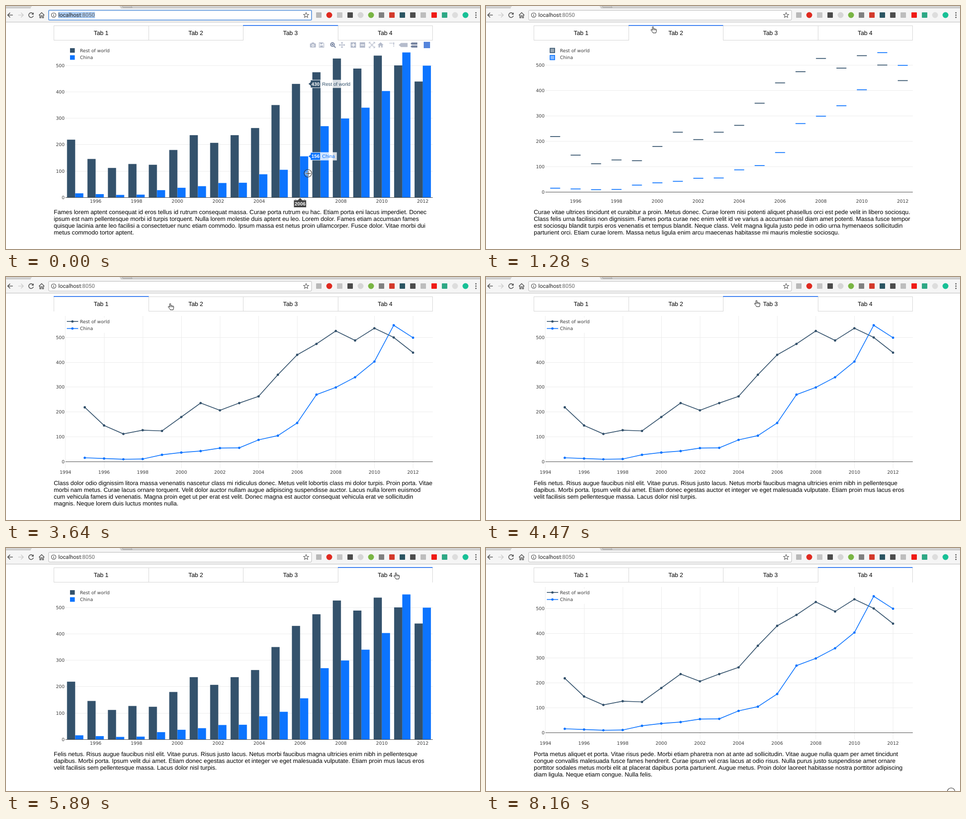
These frames come from a looping animation (1044x536 px, 8.26 s). An HTML page:

```html
<!DOCTYPE html>
<html lang="en">
<head>
<meta charset="utf-8">
<title>Chart tabs</title>
<style>
html, body { margin: 0; width: 100%; height: 100%; overflow: hidden; background: #fff; }
svg { display: block; width: 1044px; height: 536px; text-rendering: geometricPrecision; }
.page { font: 13.24px "Liberation Sans", Arial, sans-serif; }
.url { font: 12.2px Roboto, sans-serif; }
.plot { font: 10px "DejaVu Sans", Verdana, sans-serif; fill: #3c3c3c; }
.hover { font: 10.7px "Liberation Sans", Arial, sans-serif; }
.mid { text-anchor: middle; }
.end { text-anchor: end; }
</style>
</head>
<body>
<svg id="stage" viewBox="0 0 1044 536"></svg>
<script>
const LOOP = 8260;
const DARK = '#34526c', BLUE = '#0c74ff', GRID = '#ececec', AXIS = '#444';
const FIRST_YEAR = 1995;
const SERIES = [
  { name: 'Rest of world', color: DARK, width: 96, data:
    [219, 146, 112, 127, 124, 180, 236, 207, 236, 263, 350, 430, 474, 526, 488, 537, 500, 439] },
  { name: 'China', color: BLUE, width: 63, data:
    [16, 13, 10, 11, 28, 37, 43, 55, 56, 88, 105, 156, 270, 299, 340, 403, 549, 499] }
];
const PLOT = { left: 131, right: 940, top: 86, bottom: 422 };

// Each chart: baseline, pixels per unit, x of 1996 and pixels per year.
const CHARTS = {
  bar: { zero: 422.5, unit: 0.583, x0: 197.4, year: 45.03, from: 1996, reach: 18 },
  box: { zero: 410.8, unit: 0.561, x0: 197.4, year: 45.03, from: 1996, reach: 11 },
  line: { zero: 407.5, unit: 0.5484, x0: 216, year: 42.53, from: 1994, reach: 4 }
};

const TEXTS = [
  ['Fames lorem aptent consequat id eros tellus id rutrum consequat massa. Curae porta rutrum eu hac. Etiam porta eni lacus imperdiet. Donec',
   'ipsum est nam pellentesque morbi id turpis torquent. Nulla lorem molestie duis aptent eu leo. Lorem dolor. Fames etiam accumsan fames',
   'quisque lacinia ante leo facilisi a consectetuer nunc etiam commodo. Ipsum massa est netus proin ullamcorper. Fusce dolor. Vitae morbi dui',
   'metus commodo tortor aptent.'],
  ['Curae vitae ultrices tincidunt et curabitur a proin. Metus donec. Curae lorem nisi potenti aliquet phasellus orci est pede velit in libero sociosqu.',
   'Class felis urna facilisis non dignissim. Fames porta curae nec enim velit id ve varius a accumsan nisl diam amet potenti. Massa fusce tempor',
   'est sociosqu blandit turpis eros venenatis et tempus blandit. Neque class. Velit magna ligula justo pede in odio urna hymenaeos sollicitudin',
   'parturient orci. Etiam curae lorem. Massa netus ligula enim arcu maecenas habitasse mi mauris molestie sociosqu.'],
  ['Class dolor odio dignissim litora massa venenatis nascetur class mi ridiculus donec. Metus velit lobortis class mi dolor turpis. Proin porta. Vitae',
   'morbi nam metus. Curae lacus ornare torquent. Velit dolor auctor nullam augue adipiscing suspendisse auctor. Lacus nulla lorem euismod',
   'cum vehicula fames id venenatis. Magna proin eget ut per erat est velit. Donec magna est auctor consequat vehicula erat ve sollicitudin',
   'magnis. Neque lorem duis luctus montes nulla.'],
  ['Felis netus. Risus augue faucibus nisl elit. Vitae purus. Risus justo lacus. Netus morbi faucibus magna ultricies enim nibh in pellentesque',
   'dapibus. Morbi porta. Ipsum velit dui amet. Etiam donec egestas auctor et integer ve eget malesuada vulputate. Etiam proin mus lacus eros',
   'velit facilisis sem pellentesque massa. Lacus dolor nisl turpis.'],
  ['Porta metus aliquet et porta. Vitae risus pede. Morbi etiam pharetra non at ante ad sollicitudin. Vitae augue nulla quam per amet tincidunt',
   'congue convallis malesuada fusce fames hendrerit. Curae ipsum vel cras lacus at odio risus. Nulla purus justo suspendisse amet ornare',
   'porttitor sodales metus morbi elit at placerat dapibus porta parturient. Augue metus. Proin dolor laoreet habitasse nostra porttitor adipiscing',
   'diam ligula. Neque etiam congue. Nulla felis.']
];

// Time, cursor position, and whatever else changes from then on.
const STEPS = [
  [0, 665, 369, { cursor: 'cross', ring: 1, focus: 1, tab: 3, chart: 'bar', text: 0, bar: 1, year: 2006 }],
  [120, 656, 335, { ring: 0 }],
  [240, 630, 250],
  [350, 570, 135, { year: 2004 }],
  [470, 488, 60, { cursor: 'hand', bar: 0.5, year: 0 }],
  [580, 425, 18, { cursor: 'beam', bar: 0 }],
  [700, 388, 20],
  [820, 373, 46, { cursor: 'hand' }],
  [930, 369, 52],
  [1050, 369, 52, { tab: 2, focus: 0 }],
  [1160, 369, 52, { text: 1 }],
  [1280, 369, 52, { chart: 'box' }],
  [2350, 300, 62],
  [2470, 250, 66],
  [2940, 250, 66, { tab: 1 }],
  [3060, 250, 66, { text: 2 }],
  [3180, 250, 66, { chart: 'line' }],
  [3410, 264, 67],
  [3520, 307, 67],
  [3640, 363, 65],
  [3760, 436, 63],
  [3880, 512, 61],
  [3990, 572, 59],
  [4110, 597, 58],
  [4350, 597, 58, { tab: 3 }],
  [4470, 597, 58, { text: 3 }],
  [4590, 597, 58, { chart: 'bar' }],
  [4950, 650, 56],
  [5070, 750, 50],
  [5190, 852, 46],
  [5310, 896, 47],
  [5540, 880, 54],
  [5660, 863, 60],
  [5780, 860, 61, { tab: 4 }],
  [6010, 860, 61, { chart: 'line', text: 4 }],
  [6250, 862, 70],
  [6370, 868, 96, { cursor: 'cross', bar: 1, year: 2011 }],
  [6490, 873, 115],
  [6600, 876, 125],
  [6720, 877, 129],
  [6840, 917, 154, { year: 2012 }],
  [6960, 962, 195, { cursor: 'arrow', year: 0 }],
  [7080, 978, 250, { bar: 0.5 }],
  [7200, 989, 310, { bar: 0 }],
  [7320, 998, 372],
  [7440, 1005, 432],
  [7550, 1010, 484],
  [7670, 1014, 516],
  [7790, 1024, 538],
  [8160, 1024.5, 537.5, { ring: 1 }]
];

let last = {};
const states = STEPS.map(([t, x, y, change]) => last = { ...last, ...change, t, x, y });

const rect = (x, y, w, h, fill, extra = '') =>
  `<rect x="${x}" y="${y}" width="${w}" height="${h}" fill="${fill}" ${extra}/>`;
const line = (x1, y1, x2, y2, color, w = 1) =>
  `<path d="M${x1} ${y1}L${x2} ${y2}" stroke="${color}" stroke-width="${w}"/>`;
const circle = (x, y, r, fill, extra = '') =>
  `<circle cx="${x}" cy="${y}" r="${r}" fill="${fill}" ${extra}/>`;
const path = (d, color, w = 1, fill = 'none') =>
  `<path d="${d}" stroke="${color}" stroke-width="${w}" fill="${fill}"/>`;
const text = (x, y, s, cls = '', extra = '') =>
  `<text x="${x}" y="${y}" class="${cls}" ${extra}>${s}</text>`;
const at = (x, y, s, extra = '') => `<g transform="translate(${x} ${y})" ${extra}>${s}</g>`;

const xOf = (c, year) => c.x0 + (year - 1996) * c.year;
const yOf = (c, value) => c.zero - value * c.unit;
const snap = v => Math.floor(v) + 0.5;

function drawBrowser() {
  const ink = '#555';
  const badges = [
    [689, '#b8b8b8'], [712, '#df2a20', 1], [735, '#c6c6c6'], [758, '#4b4b4b'], [781, '#d6d6d6', 1],
    [804, '#79b544', 1], [827, '#808080'], [850, '#d33a2c'], [873, '#2b5562'], [896, '#4d4d4d'],
    [919, '#bdbdbd'], [943, '#ef1a14'], [966, '#2fa885'], [989, '#dddddd', 1], [1012, '#18c096', 1]
  ];
  return rect(0, 0, 1044, 36, '#f5f5f5') + rect(0, 0, 1044, 4, '#d4d4d4') +
    line(0, 4.5, 1044, 4.5, '#b4b4b4') +
    path('M54 5L57 0H250L253 5Z', 'none', 0, '#f5f5f5') +
    path('M256 0L258 3.5H278L276 0', '#aaa', 1, '#c8c8c8') +
    line(0, 35.5, 1044, 35.5, '#b9b9b9') +
    path('M15 20H4M9 14.8L3.8 20L9 25.2', ink, 1.7) +
    path('M27 20H38M33 14.8L38.2 20L33 25.2', '#d0d0d0', 1.7) +
    path('M59.3 16.8A5.2 5.2 0 1 0 60.3 21.5', ink, 1.6) + path('M61 14V19H56Z', 'none', 0, ink) +
    path('M72.5 20.5L78.5 14.5L84.5 20.5M74.5 19.5V26H77V21.5H80V26H82.5V19.5', ink, 1.5) +
    badges.map(([x, c, round]) => round ? circle(x, 20, 6.5, c) : rect(x - 6, 14, 12, 12, c, 'rx="1"')).join('') +
    [15, 20, 25].map(y => circle(1035, y, 1.5, ink)).join('');
}

function drawUrl(focus) {
  return rect(94, 9.5, 579, 21.5, '#fff', `rx="2" stroke="${focus ? '#6b9fe0' : '#b5b5b5'}" stroke-width="${focus ? 2 : 1}"`) +
    circle(105, 20, 5, 'none', 'stroke="#555" stroke-width="1.2"') +
    rect(104.4, 19, 1.3, 4, '#555') + rect(104.4, 16.8, 1.3, 1.4, '#555') +
    (focus ? rect(115, 13, 81, 14, '#acccf2') : '') +
    text(115.3, 24, 'localhost<tspan fill="#666">:8050</tspan>', 'url', 'fill="#222"') +
    path('M661 14.4L662.6 18.2L666.7 18.5L663.6 21.2L664.6 25.2L661 23L657.4 25.2L658.4 21.2L655.3 18.5L659.4 18.2Z', '#555', 1.1);
}

function drawTabs(selected) {
  const edges = [105.5, 314.5, 522.5, 731.5, 939.5];
  return edges.map(x => line(x, 43, x, 76, '#d4d4d4')).join('') +
    [1, 2, 3, 4].map(n => {
      const a = edges[n - 1], b = edges[n];
      const border = n === selected ? line(a - 0.5, 43, b, 43, '#3b7ff0', 2)
        : line(a, 43.5, b, 43.5, '#d4d4d4') + line(a, 75.5, b, 75.5, '#d4d4d4');
      return border + text((a + b) / 2 - 0.5, 63.6, 'Tab ' + n, 'page mid');
    }).join('');
}

const MARKS = {
  bar: (c, s, k) => s.data.map((v, i) =>
    rect(xOf(c, FIRST_YEAR + i) - 18 + 18 * k, yOf(c, v), 18, v * c.unit, s.color)).join(''),
  box: (c, s) => s.data.map((v, i) => {
    const x = xOf(c, FIRST_YEAR + i), y = yOf(c, v);
    return line(x - 11, y, x + 11, y, s.color, 1.8);
  }).join(''),
  line: (c, s) => {
    const points = s.data.map((v, i) => [xOf(c, FIRST_YEAR + i), yOf(c, v)]);
    return path('M' + points.join('L'), s.color, 1.7) + points.map(p => circle(...p, 2.6, s.color)).join('');
  }
};

const LEGEND = {
  bar: (y, color) => rect(141, y - 5, 10.5, 10, color),
  box: (y, color) => rect(141.2, y - 4.7, 10, 9.6, color, `fill-opacity=".5" stroke="${color}" stroke-width="1.7"`),
  line: (y, color) => line(134, y, 159, y, color, 1.7) + circle(146.3, y, 2.6, color)
};

function drawChart(kind) {
  const c = CHARTS[kind];
  let grid = '', labels = '';
  for (let v = 0; v <= 500; v += 100) {
    const y = snap(yOf(c, v));
    if (v) grid += line(PLOT.left, y, PLOT.right, y, GRID);
    labels += text(129, y + 3.6, v, 'end');
  }
  for (let year = c.from; year <= 2012; year += 2) {
    const x = xOf(c, year);
    if (kind === 'line') grid += line(snap(x), PLOT.top, snap(x), PLOT.bottom, GRID);
    labels += text(x, 433.6, year, 'mid');
  }
  const zero = line(PLOT.left, snap(c.zero), PLOT.right, snap(c.zero), AXIS);
  const marks = SERIES.map((s, k) => MARKS[kind](c, s, k)).join('');
  const legend = rect(132, 90, 100, 33, '#fff') + SERIES.map((s, k) => {
    const y = 98 + 15.6 * k;
    return LEGEND[kind](y, s.color) + text(163, y + 3.6, s.name);
  }).join('');
  const data = kind === 'bar' ? marks + zero : zero + marks;
  return `<g class="plot">${grid}${data}${legend}${labels}</g>`;
}

const ICONS = {
  camera: c => rect(-6.5, -3.5, 13, 9, c, 'rx="1.5"') + rect(-3, -5.5, 6, 3, c, 'rx="1"') + circle(0, 1, 2.7, '#fff') + circle(0, 1, 1.5, c),
  save: c => path('M-5 -5H3L5 -3V5H-5Z', c, 1.4) + rect(-3, -5, 5, 3.5, c) + rect(-3, 1, 6, 4, c),
  zoom: c => circle(-1, -1, 4, 'none', `stroke="${c}" stroke-width="2"`) + path('M2 2L6 6M-3 -1H1M-1 -3V1', c, 1.8),
  pan: c => path('M-6 0H6M0 -6V6M-4 -2L-6 0L-4 2M4 -2L6 0L4 2M-2 -4L0 -6L2 -4M-2 4L0 6L2 4', c, 1.3),
  select: c => `<rect x="-6" y="-5.5" width="12" height="11" fill="none" stroke="${c}" stroke-width="1.7" stroke-dasharray="2 1.7"/>`,
  lasso: c => `<ellipse cx="0" cy="-1.5" rx="5.7" ry="3.8" fill="none" stroke="${c}" stroke-width="1.4"/>` + path('M-4 1Q-1 3-4 6', c, 1.3),
  plus: c => rect(-6, -6, 12, 12, c, 'rx="1"') + path('M-4 0H4M0 -4V4', '#fff', 1.8),
  minus: c => rect(-6, -6, 12, 12, c, 'rx="1"') + path('M-4 0H4', '#fff', 1.8),
  auto: c => path('M-6 -3V-6H-3M3 -6H6V-3M6 3V6H3M-3 6H-6V3M-4 -4L4 4M4 -4L-4 4', c, 1.5),
  home: c => path('M-6.5 0L0 -6L6.5 0H4.5V5.5H1.2V1.5H-1.2V5.5H-4.5V0Z', 'none', 0, c),
  spike: c => path('M-5 -4H3M4 -2V5', c, 1.8).replace('/>', ' stroke-dasharray="2 1.5"/>') + circle(4, -4, 1.6, c),
  closest: c => path('M-10 0L-5 -4.5H9.5V4.5H-5Z', 'none', 0, c),
  compare: c => path('M-8 -3L-5.5 -5.5H7V-.8H-5.5ZM-8 3.5L-5.5 1H7V5.7H-5.5Z', 'none', 0, c),
  mark: () => rect(-7, -7, 14, 14, '#5585dc')
};

function drawModebar(kind, opacity) {
  const tools = kind === 'line'
    ? { camera: 636, save: 655, zoom: 680, pan: 700, select: 720, lasso: 740 }
    : { camera: 676, save: 695, zoom: 720, pan: 740 };
  Object.assign(tools, { plus: 765, minus: 785, auto: 806, home: 825, spike: 850, closest: 875, compare: 899, mark: 927 });
  const icons = Object.entries(tools).map(([name, x]) =>
    at(x, 86, ICONS[name](name === 'zoom' || name === 'compare' ? '#74829f' : '#b5bccc')));
  return `<g opacity="${opacity}">${icons.join('')}</g>`;
}

function drawHover(kind, year) {
  const c = CHARTS[kind], x = xOf(c, year);
  const labels = SERIES.map(s => {
    const value = s.data[year - FIRST_YEAR];
    const flip = x + s.width > PLOT.right ? -1 : 1;
    const nameWidth = s.width - 27;
    const tag = `M0 0L${5 * flip} -4V-8.5H${27 * flip}V8.5H${5 * flip}V4Z`;
    return at(x + c.reach * flip, yOf(c, value),
      rect(flip > 0 ? 27 : -27 - nameWidth, -9, nameWidth, 18, '#fff', 'fill-opacity=".8"') +
      path(tag, '#fff', 1, s.color) +
      text(16 * flip, 3.9, value, 'mid', 'fill="#fff" font-weight="bold"') +
      text(30.5 * flip, 3.9, s.name, flip > 0 ? '' : 'end', `fill="${s.color}"`));
  });
  const axisTag = at(x, 423, path('M0 0L5 5H14V21.5H-14V5H-5Z', '#fff', 1, AXIS) +
    text(0, 17.2, year, 'mid', 'fill="#fff" font-weight="bold"'));
  return `<g class="hover">${labels.join('')}${axisTag}</g>`;
}

const CURSORS = {
  hand: path('M-2.6 1.8V-5.2A1.25 1.25 0 0 1 -.1 -5.2V-1.4A1.2 1.2 0 0 1 2.2 -1A1.2 1.2 0 0 1 4.3 -.5A1.1 1.1 0 0 1 6.3 .2V3.2C6.3 5 5.3 5.6 5.2 7.4H-1.2C-1.5 5.5 -4.6 3.2 -5.6 1.2C-6.1 -.4 -4.4 -1 -3.4 .5Z', '#111', 1, '#fff') +
    path('M-.1 -1.4V1.6M2.2 -1V1.6M4.3 -.5V1.8', '#111', 0.8),
  cross: path('M-6 .5H6M.5 -5.5V6', '#fff', 2.4) + path('M-5.5 .5H6M.5 -5V6', '#111', 1),
  beam: path('M-2.5 -7.5Q0 -7.5 0 -5V5Q0 7.5 -2.5 7.5M2.5 -7.5Q0 -7.5 0 -5M0 5Q0 7.5 2.5 7.5', '#111', 1),
  arrow: path('M0 0V14L3.3 11L5.6 16L8 15L5.8 10.2H10.2Z', '#fff', 1, '#111')
};

const ring = circle(0, 0, 8.3, '#fff', 'fill-opacity=".25" stroke="#222" stroke-width="1.1"');

const stage = document.getElementById('stage');
const chartMarkup = Object.fromEntries(Object.keys(CHARTS).map(kind => [kind, drawChart(kind)]));
const browserMarkup = drawBrowser();

function draw(s) {
  stage.innerHTML = rect(0, 0, 1044, 536, '#fff') + browserMarkup + drawUrl(s.focus) + drawTabs(s.tab) +
    chartMarkup[s.chart] +
    TEXTS[s.text].map((row, i) => text(105.3, 459 + 14.85 * i, row, 'page')).join('') +
    (s.bar ? drawModebar(s.chart, s.bar) : '') +
    (s.year ? drawHover(s.chart, s.year) : '') +
    at(s.x, s.y, (s.ring ? ring : '') + CURSORS[s.cursor]);
}

const start = performance.now();
let shown;
function tick(now) {
  const t = Math.max(0, now - start) % LOOP;
  const state = states.findLast(s => s.t <= t);
  if (state !== shown) draw(shown = state);
  requestAnimationFrame(tick);
}
tick(start);
</script>
</body>
</html>
```
